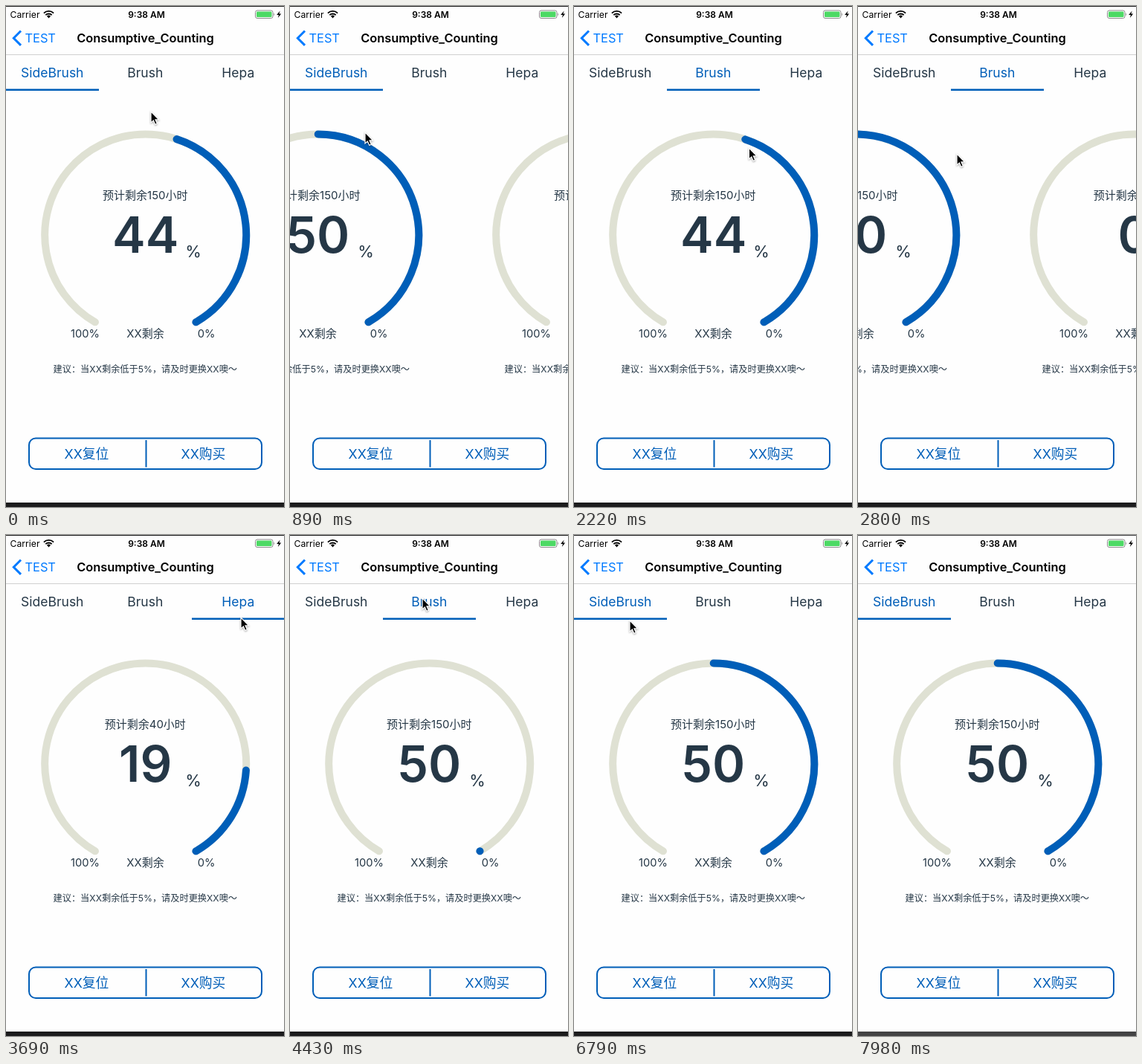
An HTML page that plays this animation: 374 px wide and 674 px high, repeating every 8.08 s.

```html
<!DOCTYPE html>
<html lang="zh-CN">
<head>
<meta charset="utf-8">
<style>
  html, body { margin: 0; width: 100%; height: 100%; overflow: hidden; background: #fefefe; }
  svg { display: block; font-family: Inter, "Noto Sans CJK SC", "Noto Sans CJK", sans-serif; fill: #253746; }
  .mid { text-anchor: middle; }
  .ring { fill: none; stroke-width: 10; stroke-linecap: round; }
</style>
</head>
<body>
<svg id="stage" width="374" height="674" viewBox="0 0 374 674">
  <rect width="374" height="674" fill="#fefefe"/>
  <g id="pages"></g>

  <!-- status bar -->
  <g fill="#000">
    <text x="5.6" y="15.5" font-size="12.2">Carrier</text>
    <text class="mid" x="189" y="15.5" font-size="12" font-weight="600">9:38 AM</text>
    <path d="M57.5 16.5 L54.9 13.6 A3.9 3.9 0 0 1 60.1 13.6 Z"/>
    <g fill="none" stroke="#000" stroke-width="1.8">
      <path d="M53.3 12.2 A6 6 0 0 1 61.7 12.2"/>
      <path d="M50.9 9.6 A9.4 9.4 0 0 1 64.1 9.6"/>
    </g>
    <rect x="335.5" y="6" width="23.5" height="10.5" rx="2.5" fill="#fff" stroke="#8a8a8a"/>
    <rect x="337" y="7.5" width="20.5" height="7.5" rx="1.2" fill="#4cd964"/>
    <path d="M360.3 9.3 Q362.2 11.2 360.3 13.2 Z" fill="#8a8a8a"/>
    <path d="M368.6 6.6 L364.2 12 H367 L365.8 16 L370.2 10.5 H367.4 Z"/>
  </g>

  <!-- navigation bar -->
  <path d="M20 33.5 L10.3 43.2 L20 52.9" fill="none" stroke="#007aff" stroke-width="3"/>
  <text x="25.5" y="49.3" font-size="16.4" fill="#007aff">TEST</text>
  <text class="mid" x="187.5" y="49" font-size="16.4" font-weight="600" fill="#000">Consumptive_Counting</text>
  <rect y="65" width="374" height="1" fill="#d0d0d0"/>

  <g id="tabs" class="mid" font-size="17.5"></g>
  <rect id="bar" y="111.5" width="125" height="2.5" fill="#005eb8"/>

  <!-- buttons -->
  <g fill="none" stroke="#005eb8" stroke-width="2">
    <rect x="31" y="581.5" width="313" height="41.5" rx="9"/>
    <path d="M188.5 584 V620.5"/>
  </g>
  <g class="mid" font-size="17.8" fill="#005eb8">
    <text x="108.5" y="609">XX复位</text>
    <text x="265.5" y="609">XX购买</text>
  </g>

  <g id="frame"><rect width="374" height="1"/><rect y="668" width="374" height="6"/></g>
  <path id="cursor" d="M0 0 V15 L3.4 11.9 L5.8 17.4 L8.3 16.3 L6 10.9 H10.6 Z" fill="#000" stroke="#fff"
        stroke-width="1.2" style="filter:drop-shadow(0 1px 1px rgba(0,0,0,.35))"/>
</svg>
<script>
const NS = 'http://www.w3.org/2000/svg';
const $ = id => document.getElementById(id);
const LOOP = 8080, STEP = 147.6;      // the screen refreshes once per STEP ms
const PAGE = 375, GOAL = 50, RATE = 6.27; // RATE: percent per step
const CX = 187.7, CY = 308, R = 135.5;
const BLUE = '#005eb8', DARK = '#253746';

function add(parent, tag, attrs, text) {
  const el = document.createElementNS(NS, tag);
  for (const a in attrs) el.setAttribute(a, attrs[a]);
  if (text) el.textContent = text;
  parent.appendChild(el);
  return el;
}

// Gauge arc from the lower right end, counter-clockwise over 300 degrees
function arc(pct) {
  const at = deg => {
    const a = deg * Math.PI / 180;
    return (CX + R * Math.cos(a)).toFixed(2) + ' ' + (CY + R * Math.sin(a)).toFixed(2);
  };
  const sweep = Math.max(pct, 0.02) * 3;
  return `M${at(60)} A${R} ${R} 0 ${sweep > 180 ? 1 : 0} 0 ${at(60 - sweep)}`;
}

function makePage(hours) {
  const g = add($('pages'), 'g', {});
  const label = (x, y, size, text, more) =>
    add(g, 'text', { x, y, 'font-size': size, class: 'mid', ...more }, text);
  add(g, 'path', { class: 'ring', stroke: '#dfe1d3', d: arc(100) });
  const ring = add(g, 'path', { class: 'ring', stroke: BLUE });
  label(187.3, 259.5, 15, `预计剩余${hours}小时`);
  const num = label(187.7, 332, 67, '0', { 'font-weight': 600 });
  label(252, 337.5, 22, '%');
  label(106.5, 446, 14.7, '100%');
  label(187.5, 446, 15, 'XX剩余');
  label(269.5, 446, 14.7, '0%');
  label(187.3, 493, 12.2, '建议：当XX剩余低于5%，请及时更换XX噢～');
  return { g, ring, num };
}

const pages = [150, 150, 40].map(makePage);
const tabs = ['SideBrush', 'Brush', 'Hepa'].map((name, i) =>
  add($('tabs'), 'text', { x: 62.3 + i * 125, y: 96 }, name));

// Keys: step, then values
const scrollKeys = [[3, 0], [4, 8], [5, 60], [6, 150], [7, 335], [8, 375], [17, 375], [18, 445],
  [19, 566], [20, 715], [21, 746], [22, 750], [29, 750], [30, 375], [35, 375], [36, 0]];
const cursorKeys = [[3, 195, 142], [4, 186, 145], [6, 101, 170], [12, 101, 170], [17, 325, 205],
  [19, 133, 199], [20, 110, 199], [23, 255, 140], [25, 316, 111], [27, 305, 94], [29, 182, 85],
  [30, 178, 85], [31, 178, 85], [34, 64, 84], [35, 61, 83], [45, 61, 83], [46, 75, 115], [50, 331, 640]];

function track(keys, k) {
  if (k <= keys[0][0]) return keys[0].slice(1);
  for (let i = 1; i < keys.length; i++) {
    const a = keys[i - 1], b = keys[i];
    if (k <= b[0]) {
      const u = (k - a[0]) / (b[0] - a[0]);
      return a.slice(1).map((v, j) => v + (b[j + 1] - v) * u);
    }
  }
  return keys[keys.length - 1].slice(1);
}

const count = steps => Math.min(GOAL, Math.max(0, steps * RATE));

function draw(t) {
  const k = Math.min(54, Math.floor((t + 10) / STEP));
  const active = k < 8 ? 0 : k < 22 ? 1 : k < 30 ? 2 : k < 36 ? 1 : 0;
  const [scroll] = track(scrollKeys, k);
  const values = [
    count(k < 36 ? k + 44 / RATE : k - 35.93),
    count(k < 30 ? k - 8 : k - 30),
    count(k - 22)
  ];
  // On a return visit the old number stays for one step
  const stale = k === 30 || k === 36;

  pages.forEach((p, i) => {
    p.g.setAttribute('transform', `translate(${i * PAGE - scroll} 0)`);
    p.ring.setAttribute('d', arc(values[i]));
    p.num.textContent = stale && i === active ? GOAL : Math.round(values[i]);
    tabs[i].setAttribute('fill', i === active ? BLUE : DARK);
  });
  $('bar').setAttribute('x', active * 125);

  const [x, y] = track(cursorKeys, k);
  $('cursor').setAttribute('transform', `translate(${x} ${y})`);
  $('cursor').setAttribute('visibility', k > 50 ? 'hidden' : 'visible');
  $('frame').setAttribute('fill', k >= 54 ? '#434344' : '#1c1c1d');
}

const start = performance.now();
function tick() {
  draw((performance.now() - start) % LOOP);
  requestAnimationFrame(tick);
}
tick();
</script>
</body>
</html>
```
